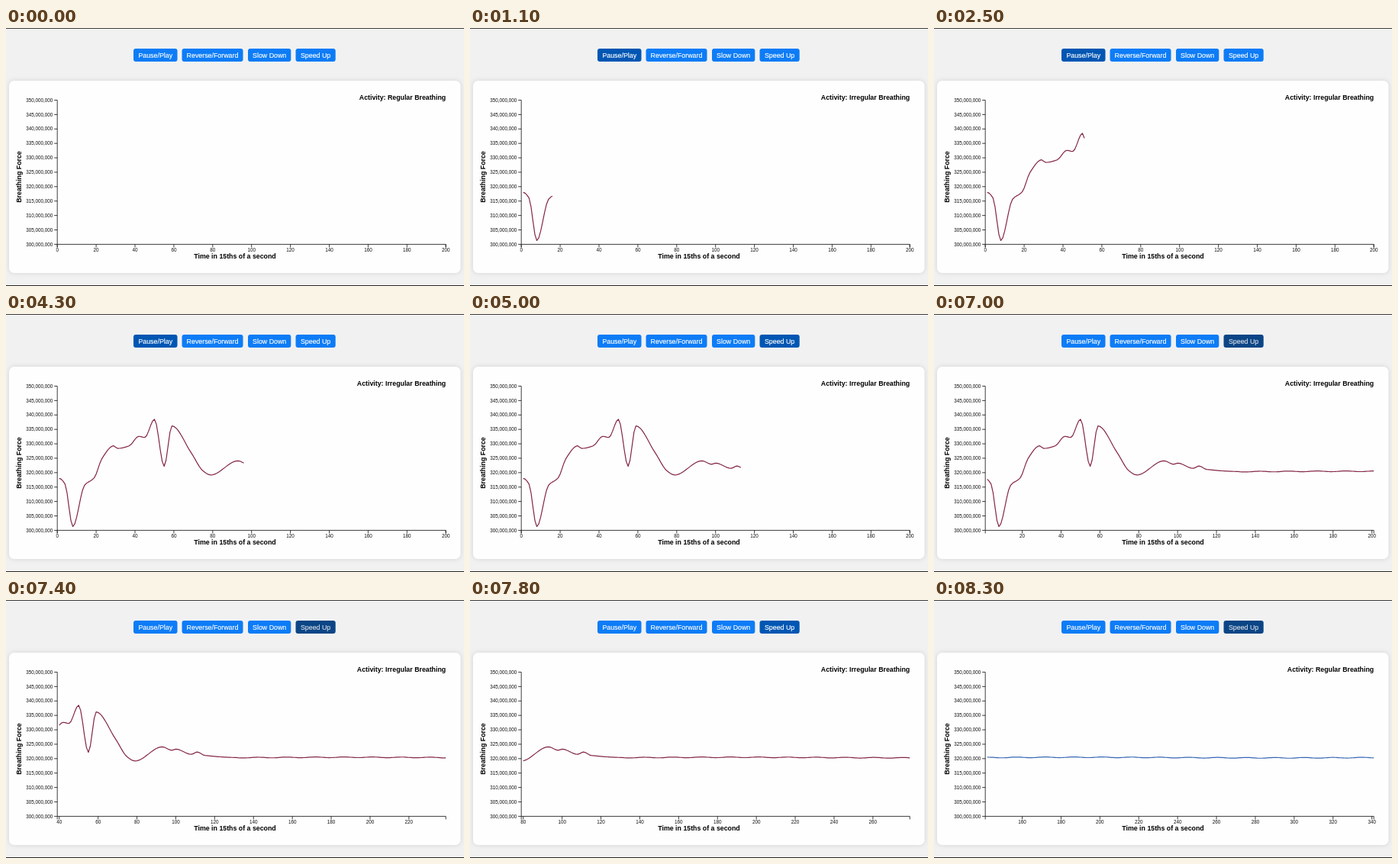
These frames come from a looping animation (600 px wide and 338 px high, 8400 ms). An HTML page:

```html
<!DOCTYPE html>
<html lang="en">
<head>
<meta charset="utf-8">
<title>Breathing force</title>
<style>
  html, body { margin: 0; width: 100%; height: 100%; overflow: hidden; background: #f1f1f2; }
  svg { display: block; width: 600px; height: 338px; font-family: "Liberation Sans", Arial, sans-serif; }
  .card { fill: #fefefe; filter: drop-shadow(0 0 3px rgba(0, 0, 0, .12)); }
  .title { font-size: 8.8px; font-weight: bold; }
  .tick { font-size: 6.3px; fill: #111; }
  .axis { fill: none; stroke: #1a1a1a; stroke-width: .85; }
  .button { font-size: 8.85px; text-anchor: middle; stroke: currentColor; stroke-width: .15; }
  .curve { fill: none; stroke-width: 1.2; stroke-linejoin: round; }
</style>
</head>
<body>
<svg id="stage" viewBox="0 0 600 338">
  <path d="M0 .4H600M0 337.5H600" stroke="#111" stroke-width=".9"/>
  <rect class="card" x="4" y="69" width="591.5" height="252" rx="7"/>
</svg>
<script>
const LOOP = 8400, FRAME = 100;
const LEFT = 67.2, RIGHT = 576.2, TOP = 94.5, BOTTOM = 283.4, SPAN = 200;
const BLUE = '#0d7cf6', HOVER = '#0056b3', PRESSED = '#0b4586';
const IRREGULAR = '#832647', REGULAR = '#3566b4';
const REGULAR_FROM = 315;

const stage = document.getElementById('stage');
function add(tag, attributes, text = '', parent = stage) {
  const node = document.createElementNS('http://www.w3.org/2000/svg', tag);
  for (const [key, value] of Object.entries(attributes)) node.setAttribute(key, value);
  node.textContent = text;
  parent.append(node);
  return node;
}

// Turning points of the breath: [sample, millions above 300]
const KEYS = [
  [1, 18], [4, 16], [8, 1.3], [14, 15.6], [19, 18.2], [23, 24.9], [29, 29.3], [31, 28.4],
  [37, 29.3], [42, 32.6], [45, 32.2], [50, 38.5], [55, 22.2], [59, 36.2], [69, 26.8], [75, 20.6],
  [79, 19.2], [93, 24.1], [98, 22.9], [100, 23.3], [108, 21.5], [111, 22.3], [115, 21.1], [132, 20.4]
];
const secant = i => (KEYS[i + 1][1] - KEYS[i][1]) / (KEYS[i + 1][0] - KEYS[i][0]);
// Flat at turning points and ends, harmonic mean of the neighbours elsewhere
function slope(i) {
  if (i === 0 || i === KEYS.length - 1) return 0;
  const before = secant(i - 1), after = secant(i);
  return before * after > 0 ? 2 * before * after / (before + after) : 0;
}
function force(sample) {
  const i = KEYS.findIndex(key => key[0] > sample) - 1;
  if (i < 0) {
    return 20.37 + .12 * Math.cos(2 * Math.PI * (sample - 157) / 14.8) + .1 * Math.cos((sample - 190) / 32);
  }
  const [x0, y0] = KEYS[i], [x1, y1] = KEYS[i + 1];
  const width = x1 - x0, u = (sample - x0) / width, v = 1 - u;
  return y0 * v * v * (1 + 2 * u) + y1 * u * u * (1 + 2 * v)
    + width * u * v * (slope(i) * v - slope(i + 1) * u);
}

const toX = offset => LEFT + offset * (RIGHT - LEFT) / SPAN;
const toY = value => BOTTOM - value * (BOTTOM - TOP) / 50;

const buttons = [
  ['Pause/Play', 167, 57.5], ['Reverse/Forward', 230.5, 80],
  ['Slow Down', 317, 56.3], ['Speed Up', 379.5, 52.2]
].map(([label, x, width]) => ({
  box: add('rect', { x, y: 27, width, height: 17, rx: 3 }),
  text: add('text', { class: 'button', x: x + width / 2, y: 38.6 }, label)
}));

// Vertical axis and titles
let yAxis = `M${LEFT} ${TOP}V${BOTTOM}`;
for (let value = 0; value <= 50; value += 5) {
  yAxis += `M${LEFT - 4} ${toY(value)}H${LEFT}`;
  add('text', { class: 'tick', x: 61.3, y: toY(value) + 2.2, 'text-anchor': 'end' }, `${300 + value},000,000`);
}
add('path', { class: 'axis', d: yAxis });
add('text', { class: 'title', x: 300, y: 302.3, 'text-anchor': 'middle' }, 'Time in 15ths of a second');
add('text', { class: 'title', transform: 'translate(19.5 195) rotate(-90)', 'text-anchor': 'middle' }, 'Breathing Force');
const activity = add('text', { class: 'title', x: RIGHT, y: 94.3, 'text-anchor': 'end' });

const xAxis = add('path', { class: 'axis' });
const xLabels = add('g', { class: 'tick', 'text-anchor': 'middle' });
const curve = add('path', { class: 'curve' });

// Playback starts at 40 ms per sample; each click on Speed Up halves the step
const PLAY = 460, SPEED_UPS = [5500, 7040, 8180];
function samplesAt(time) {
  const starts = [PLAY, ...SPEED_UPS];
  return Math.floor(starts.reduce((sum, start, i) => {
    const end = Math.min(time, starts[i + 1] ?? LOOP);
    return sum + Math.max(0, end - start) * 2 ** i / 40;
  }, 0));
}

const isPressed = (time, click) => time >= click - 100 && time < click + 450;

function drawButtons(time) {
  const hovered = time < 200 ? -1 : time < 4700 ? 0 : 3;
  const pressed = SPEED_UPS.some(click => isPressed(time, click));
  buttons.forEach(({ box, text }, i) => {
    const down = pressed && i === hovered;
    box.setAttribute('fill', down ? PRESSED : i === hovered ? HOVER : BLUE);
    text.setAttribute('fill', down ? '#d5dce6' : '#fff');
    text.setAttribute('color', down ? '#d5dce6' : '#fff');
  });
}

function drawTimeAxis(start) {
  let path = `M${LEFT} ${BOTTOM + 4}V${BOTTOM}H${RIGHT}V${BOTTOM + 4}`;
  xLabels.replaceChildren();
  for (let tick = Math.ceil(start / 20) * 20; tick <= start + SPAN; tick += 20) {
    const x = toX(tick - start);
    path += `M${x} ${BOTTOM}v4`;
    add('text', { x, y: 293.2 }, tick, xLabels);
  }
  xAxis.setAttribute('d', path);
}

function draw(time) {
  const count = samplesAt(time), start = Math.max(0, count - SPAN);
  const regular = count === 0 || count >= REGULAR_FROM;
  drawButtons(time);
  drawTimeAxis(start);

  const points = [];
  for (let sample = start + 1; sample <= count; sample++) {
    points.push(`${toX(sample - start).toFixed(2)} ${toY(force(sample)).toFixed(2)}`);
  }
  curve.setAttribute('d', points.length ? 'M' + points.join('L') : '');
  curve.setAttribute('stroke', regular ? REGULAR : IRREGULAR);
  activity.textContent = `Activity: ${regular ? 'Regular' : 'Irregular'} Breathing`;
}

const origin = performance.now();
function tick() {
  const time = (performance.now() - origin) % LOOP;
  draw(Math.floor(time / FRAME) * FRAME);
  requestAnimationFrame(tick);
}
tick();
</script>
</body>
</html>
```
